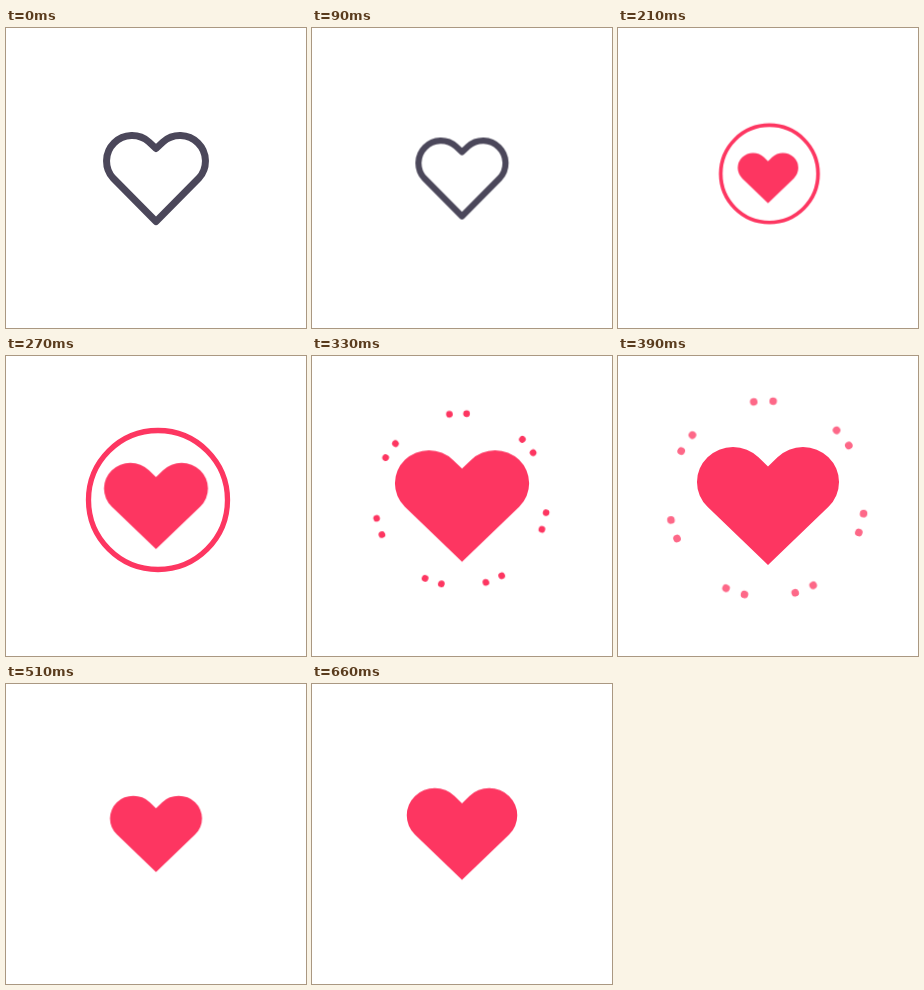
Animation of 300x300 px, one loop 930 ms. Source, as an HTML page without scripts:

```html
<!DOCTYPE html>
<html lang="en">
<head>
<meta charset="utf-8">
<title>Like button</title>
<style>
  :root { --ink: #4b475a; --red: #fd3661; }

  html, body { margin: 0; width: 100%; height: 100%; overflow: hidden; background: #fff; }
  svg { display: block; width: 100%; height: 100%; }

  /* 31 ticks of 30 ms; one tick is 3.2258 % */
  .outline, .ring, .dots, .heart {
    transform-origin: 0 0;
    animation: .93s steps(1) infinite;
  }
  .outline { fill: none; stroke: var(--ink); stroke-width: 7; stroke-linejoin: round; animation-name: shrink; }
  .ring { fill: none; stroke: var(--red); stroke-width: 5.3; animation-name: expand; }
  .dots { fill: var(--red); animation-name: burst; }
  .heart { fill: var(--red); animation-name: pop; }

  @keyframes shrink {
    0% { transform: scale(1); }
    3.225% { transform: scale(.985); }
    6.451% { transform: scale(.94); animation-timing-function: steps(2); }
    12.903% { transform: scale(.82); }
    16.129%, 100% { transform: scale(0); }
  }

  @keyframes expand {
    0% { transform: scale(0); }
    16.129% { transform: scale(.36); animation-timing-function: steps(3); }
    25.806% { transform: scale(.87); }
    29.032% { transform: scale(1); }
    32.258% { transform: scale(1.12); }
    35.483%, 100% { transform: scale(0); }
  }

  @keyframes burst {
    0% { transform: scale(0); opacity: 1; }
    35.483% { transform: scale(.88); opacity: 1; animation-timing-function: steps(2); }
    41.935% { transform: scale(1); opacity: .75; animation-timing-function: steps(3); }
    51.612% { transform: scale(1.12); opacity: .15; }
    54.838%, 100% { transform: scale(0); opacity: 0; }
  }

  @keyframes pop {
    0% { transform: scale(0); }
    16.129% { transform: scale(.12); animation-timing-function: steps(4); }
    29.032% { transform: scale(.732); }
    32.258% { transform: scale(.86); }
    35.483% { transform: scale(.945); }
    38.709% { transform: scale(.99); }
    41.935% { transform: scale(1); }
    45.161% { transform: scale(.94); animation-timing-function: steps(2); }
    51.612% { transform: scale(.71); }
    54.838% { transform: scale(.648); }
    58.064% { transform: scale(.66); animation-timing-function: steps(2); }
    64.516% { transform: scale(.735); }
    67.741% { transform: scale(.766); }
    70.967%, 100% { transform: scale(.778); }
  }
</style>
</head>
<body>
<svg viewBox="0 0 300 300">
  <defs>
    <g id="pair">
      <circle cy="-98" r="3.8" transform="rotate(-5.7)"/>
      <circle cy="-98" r="3.8" transform="rotate(5.7)"/>
    </g>
  </defs>
  <g transform="translate(150 150)">
    <path class="outline" d="M0 43.5L-43 0A25.5 25.5 0 0 1-7-36L0-29.5L7-36A25.5 25.5 0 0 1 43 0Z"/>
    <circle class="ring" cx="2" cy="-6" r="69.5"/>
    <g class="dots">
      <g transform="translate(-1.3 -7) rotate(-1.9)">
        <use href="#pair"/>
        <use href="#pair" transform="rotate(53.1)"/>
        <use href="#pair" transform="rotate(106.2)"/>
        <use href="#pair" transform="rotate(159.3)"/>
        <use href="#pair" transform="rotate(-53.1)"/>
        <use href="#pair" transform="rotate(-106.2)"/>
        <use href="#pair" transform="rotate(-159.3)"/>
      </g>
    </g>
    <path class="heart" d="M0 59L-60.5 .75A36 35 0 0 1-9.5-48.75L0-39.5L9.5-48.75A36 35 0 0 1 60.5 .75Z"/>
  </g>
</svg>
</body>
</html>
```
